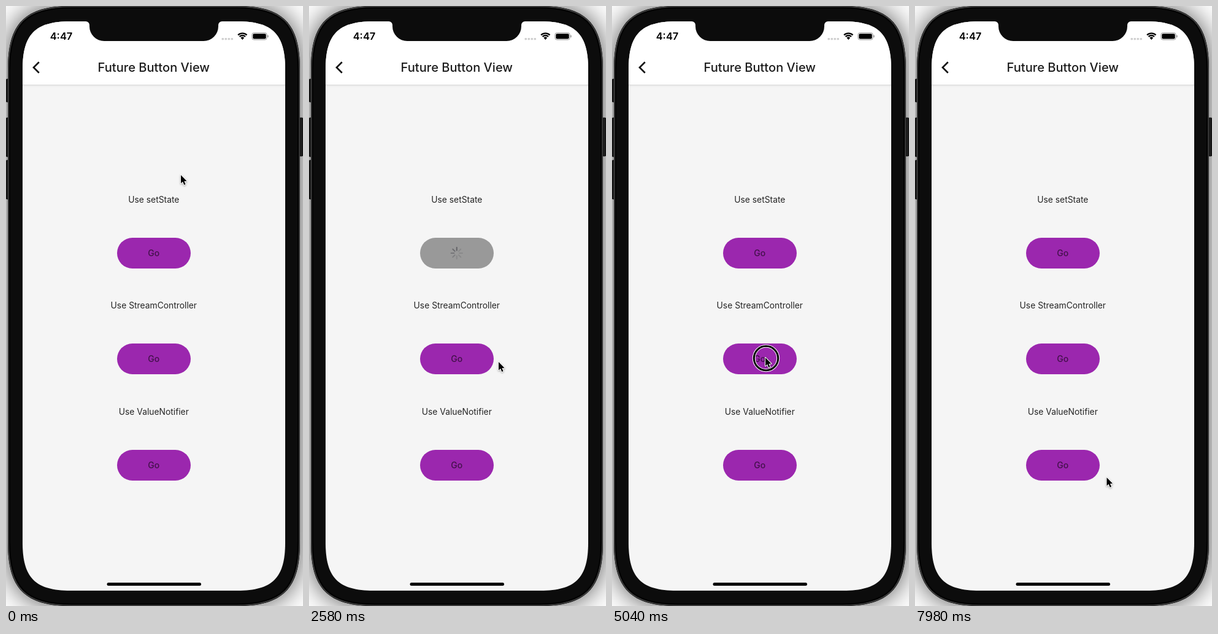
An HTML page with a canvas that plays this animation: 484x976 px, repeating every 8 s.

```html
<!DOCTYPE html>
<html lang="en">
<head>
<meta charset="utf-8">
<title>Future Button View</title>
<style>
  html, body { margin: 0; width: 100%; height: 100%; overflow: hidden; background: #fff; }
  canvas { display: block; width: 484px; height: 976px; }
</style>
</head>
<body>
<canvas id="stage"></canvas>
<script>
const W = 484, H = 976, LOOP = 8000, STEP = 60;
const MID = 240.8, TURN = Math.PI * 2;
const PRESS = 120, SPIN = 900, LOAD = SPIN * 3;
const FONT = 'Inter, Roboto, sans-serif';
const BEZEL = '#0c0c0c';

const canvas = document.getElementById('stage');
const ctx = canvas.getContext('2d');
const dpr = window.devicePixelRatio || 1;
canvas.width = W * dpr;
canvas.height = H * dpr;

const rows = [
  { label: 'Use setState', click: 1380 },
  { label: 'Use StreamController', click: 5040 },
  { label: 'Use ValueNotifier', click: Infinity }
];

const home = { x: 285, y: 275 };
const moves = [
  { from: 180, to: 900, x: 239, y: 411 },
  { from: 2220, to: 2580, x: 309, y: 579 },
  { from: 2580, to: 3000, x: 350, y: 625 },
  { from: 3060, to: 4140, x: 273.5, y: 572 },
  { from: 4140, to: 4380, x: 250, y: 572 },
  { from: 6420, to: 6900, x: 387, y: 652 },
  { from: 6900, to: 7200, x: 372.5, y: 677 },
  { from: 7260, to: 7980, x: 312.5, y: 767 }
];

function pointerAt(t) {
  let { x, y } = home;
  for (const m of moves) {
    const u = Math.min(1, Math.max(0, (t - m.from) / (m.to - m.from)));
    const e = u * u * (3 - 2 * u);
    x += (m.x - x) * e;
    y += (m.y - y) * e;
  }
  return { x, y };
}

function fill(color) {
  ctx.fillStyle = color;
  ctx.fill();
}

function stroke(color, width) {
  ctx.strokeStyle = color;
  ctx.lineWidth = width;
  ctx.stroke();
}

function box(x, y, w, h, r) {
  ctx.beginPath();
  ctx.roundRect(x, y, w, h, r);
}

function trace(...points) {
  ctx.beginPath();
  points.forEach(([x, y]) => ctx.lineTo(x, y));
}

// rectangle with continuous corners, each reaching e along its sides
function softBox(x, y, w, h, e) {
  const c = e * .267, r = x + w, b = y + h;
  ctx.beginPath();
  ctx.moveTo(x + e, y);
  ctx.lineTo(r - e, y);
  ctx.bezierCurveTo(r - c, y, r, y + c, r, y + e);
  ctx.lineTo(r, b - e);
  ctx.bezierCurveTo(r, b - c, r - c, b, r - e, b);
  ctx.lineTo(x + e, b);
  ctx.bezierCurveTo(x + c, b, x, b - c, x, b - e);
  ctx.lineTo(x, y + e);
  ctx.bezierCurveTo(x, y + c, x + c, y, x + e, y);
}

function text(str, x, y, size, weight, color) {
  ctx.font = `${weight} ${size}px ${FONT}`;
  ctx.textAlign = 'center';
  ctx.fillStyle = color;
  ctx.fillText(str, x, y);
}

function sideKey(x, y, h) {
  box(x, y, 6, h, 1.5);
  fill('#1c1c1c');
  stroke('#050505', 1);
}

function drawBody() {
  ctx.fillStyle = '#fff';
  ctx.fillRect(0, 0, W, H);
  ctx.save();
  ctx.shadowColor = 'rgba(0,0,0,.7)';
  ctx.shadowBlur = 44 * dpr;
  softBox(3, 0, 476, 976, 104);
  fill(BEZEL);
  ctx.restore();

  sideKey(0, 119, 37);
  sideKey(0, 182, 63);
  sideKey(0, 251, 63);
  sideKey(478, 182, 62);

  softBox(3, 0, 476, 976, 104);
  fill(BEZEL);
  softBox(4, 1, 474, 974, 103);
  stroke('#484848', 1.4);
  softBox(6, 3, 470, 970, 101);
  stroke('#020202', 2);
}

function drawNotch() {
  const left = 136, right = 346, top = 25, bottom = 57, r = 24, flare = 6;
  ctx.beginPath();
  ctx.moveTo(left - flare, top - 1);
  ctx.lineTo(left - flare, top);
  ctx.arcTo(left, top, left, bottom, flare);
  ctx.arcTo(left, bottom, right, bottom, r);
  ctx.arcTo(right, bottom, right, top, r);
  ctx.arcTo(right, top, right + flare, top, flare);
  ctx.lineTo(right + flare, top - 1);
  fill(BEZEL);
}

function drawStatus() {
  text('4:47', 90, 55, 16.5, 600, '#000');
  for (let i = 0; i < 4; i++) {
    box(351.5 + i * 5, 52, 3.5, 3.2, 1);
    fill('#cfcfcf');
  }

  const fan = r => {
    ctx.beginPath();
    ctx.arc(385.3, 54.5, r, -TURN * .375, -TURN * .125);
  };
  for (const r of [10.2, 6.6]) {
    fan(r);
    stroke('#000', 2.3);
  }
  fan(4);
  ctx.lineTo(385.3, 55);
  fill('#000');

  box(400.8, 43.5, 24.4, 11.5, 3.4);
  stroke('#999', 1);
  box(402.3, 45, 21.4, 8.5, 2);
  fill('#000');
  box(426.2, 47.3, 1.5, 4, 1);
  fill('#999');
}

function drawBar() {
  const fade = ctx.createLinearGradient(0, 128, 0, 133);
  fade.addColorStop(0, 'rgba(0,0,0,.18)');
  fade.addColorStop(.25, 'rgba(0,0,0,.04)');
  fade.addColorStop(1, 'rgba(0,0,0,0)');
  ctx.fillStyle = fade;
  ctx.fillRect(27, 128, 428, 5);
  ctx.fillStyle = '#fff';
  ctx.fillRect(27, 25, 428, 103);
  trace([53.8, 91.2], [45, 100], [53.8, 108.8]);
  stroke('#111', 2.7);
  text('Future Button View', MID, 107, 20.1, 500, '#1c1c1c');
}

function drawSpinner(x, y, age) {
  const active = Math.floor(age / SPIN * 8);
  for (let i = 0; i < 8; i++) {
    const rank = (i - active + 80) % 8;
    const alpha = .18 + .1 * Math.max(0, rank - 3);
    ctx.save();
    ctx.translate(x, y);
    ctx.rotate(i * TURN / 8);
    box(-1, -10.2, 2, 6.8, 1);
    fill(`rgba(60,60,68,${alpha})`);
    ctx.restore();
  }
}

function drawRow({ label, click }, i, t) {
  const y = 377 + Math.floor(i * 172.5);
  const age = t - click - PRESS;
  const busy = age >= 0 && age < LOAD;
  text(label, MID, y - 57, 13.85, 400, '#252525');
  box(181, y, 120, 50, 25);
  fill(busy ? '#999' : '#9b27ae');
  if (busy) drawSpinner(MID, y + 25, age);
  else text('Go', MID, y + 29.8, 14, 500, 'rgba(0,0,0,.58)');
}

function drawRing(x, y) {
  ctx.beginPath();
  ctx.arc(x, y, 19.7, 0, TURN);
  stroke('#fff', 5);
  stroke('#000', 3);
}

function drawPointer({ x, y }) {
  ctx.save();
  ctx.translate(x, y);
  trace([0, 0], [0, 13.6], [3.1, 10.8], [5.3, 16], [7.6, 15], [5.4, 10], [9.6, 9.7]);
  ctx.closePath();
  ctx.shadowColor = 'rgba(0,0,0,.35)';
  ctx.shadowBlur = 3 * dpr;
  ctx.shadowOffsetY = dpr;
  ctx.lineJoin = 'round';
  stroke('#fff', 2);
  ctx.shadowColor = 'transparent';
  fill('#000');
  ctx.restore();
}

function draw(t) {
  const pointer = pointerAt(t);
  ctx.setTransform(dpr, 0, 0, dpr, 0, 0);
  drawBody();
  ctx.save();
  softBox(27, 25, 428, 926, 78);
  fill('#f5f5f5');
  ctx.clip();
  drawBar();
  drawStatus();
  rows.forEach((row, i) => drawRow(row, i, t));
  box(164.5, 938, 153.5, 5, 2.5);
  fill('#000');
  ctx.restore();
  drawNotch();
  if (rows.some(({ click }) => t >= click && t < click + PRESS)) {
    drawRing(pointer.x + 1, pointer.y + 1);
  }
  drawPointer(pointer);
}

const start = performance.now();
function tick() {
  const t = (performance.now() - start) % LOOP;
  draw(Math.floor(t / STEP) * STEP);
  requestAnimationFrame(tick);
}
tick();
</script>
</body>
</html>
```
